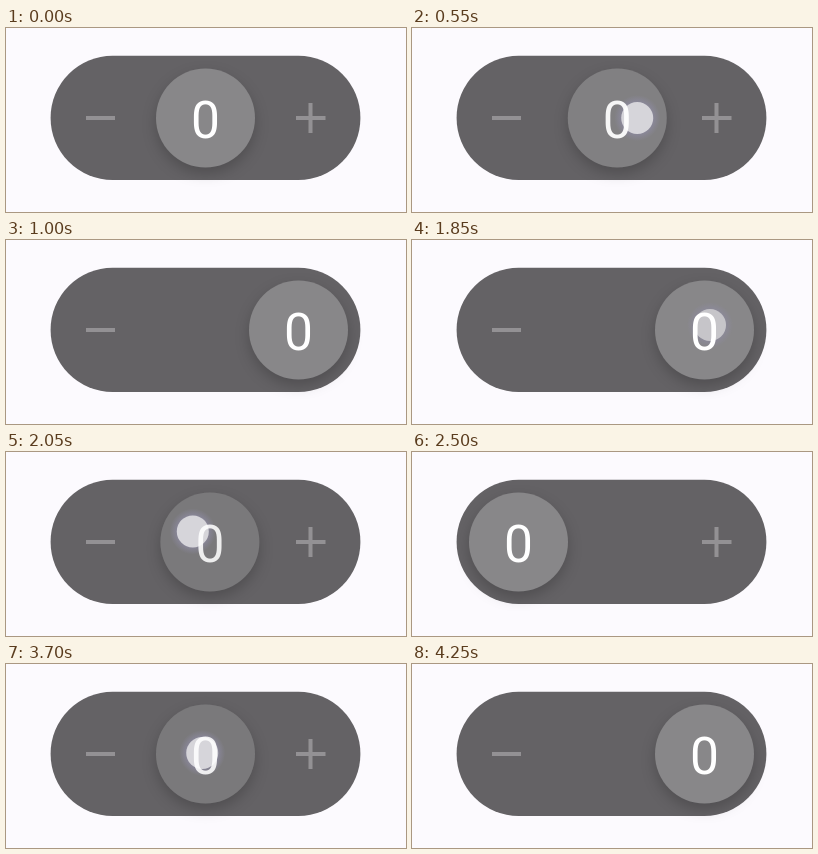
Write an HTML page that moves like this. It is 400 by 184 pixels and loops after 4.35 s.

```html
<!DOCTYPE html>
<html lang="en">
<head>
<meta charset="utf-8">
<title>Swipe counter</title>
<style>
  html, body { margin: 0; width: 100%; height: 100%; overflow: hidden; background: #fcfafe; }
  svg { display: block; width: 100vw; height: 100vh; }
  text { font: 400 51.5px Roboto, sans-serif; text-anchor: middle; fill: #fff; }
  #disc { filter: drop-shadow(0 6px 7px rgba(0, 0, 0, .2)); }
</style>
</head>
<body>
<svg viewBox="0 0 400 184">
  <defs>
    <radialGradient id="halo">
      <stop offset=".65" stop-color="#8f8ca6" stop-opacity=".7"/>
      <stop offset="1" stop-color="#8f8ca6" stop-opacity="0"/>
    </radialGradient>
  </defs>
  <rect x="44.600" y="27.800" width="309.800" height="124.200" rx="62" fill="#646265"/>
  <path d="M80 90h29M290 90h29.500M304.500 75v30" stroke="#939194" stroke-width="4"/>
  <g id="disc">
    <circle cy="90" r="49.500" fill="#888789"/>
    <circle id="shade" cy="90" r="49.500"/>
  </g>
  <g id="touch">
    <circle r="23" fill="url(#halo)"/>
    <circle r="16" fill="#d6d5da"/>
  </g>
  <text id="count" y="110">0</text>
</svg>
<script>
const LOOP = 4350, STEP = 50, FADE = 100;
const LEFT = 106.5, MID = 199.5, RIGHT = 292.5;
const [disc, shade, touch, count] =
  ['disc', 'shade', 'touch', 'count'].map(id => document.getElementById(id));

// Each swipe: finger path, knob travel and time the knob takes
const swipes = [
  { start: 500, end: 950, from: [204, 90], to: [395, 90], knob: [MID, RIGHT], glide: 330 },
  { start: 1850, end: 2350, from: [298, 85], to: [20, 71], knob: [RIGHT, LEFT], glide: 413 },
  { start: 3000, end: 3350, from: [106, 85], to: [0, 47], knob: [LEFT, LEFT], glide: 350 },
  { start: 3500, end: 3950, from: [110, 89], to: [304, 89], knob: [LEFT, RIGHT], glide: 400 }
];

const clamp = u => Math.min(1, Math.max(0, u));
const smooth = u => u * u * (3 - 2 * u);
const mix = (a, b, u) => a + (b - a) * u;

function draw(t) {
  const s = swipes.findLast(s => t >= s.start) || swipes[0];
  const age = t - s.start, left = s.end - t;
  const x = mix(...s.knob, smooth(clamp(age / s.glide)));
  const press = clamp(Math.min(age, left) / FADE);
  disc.setAttribute('transform', `translate(${x} 0)`);
  shade.setAttribute('opacity', press * .1);
  count.setAttribute('x', x);
  count.setAttribute('opacity', 1 - press * .13);

  const u = clamp(age / (s.end - s.start));
  const [fx, fy] = s.from.map((v, i) => mix(v, s.to[i], u));
  touch.setAttribute('transform', `translate(${fx} ${fy})`);
  touch.setAttribute('opacity', age < 0 ? 0 : Math.min(clamp(.8 + age / FADE), clamp(left / FADE)));
}

const start = performance.now();
function tick(now) {
  const t = Math.max(0, now - start) % LOOP;
  draw(Math.floor(t / STEP) * STEP);
  requestAnimationFrame(tick);
}
draw(0);
requestAnimationFrame(tick);
</script>
</body>
</html>
```
